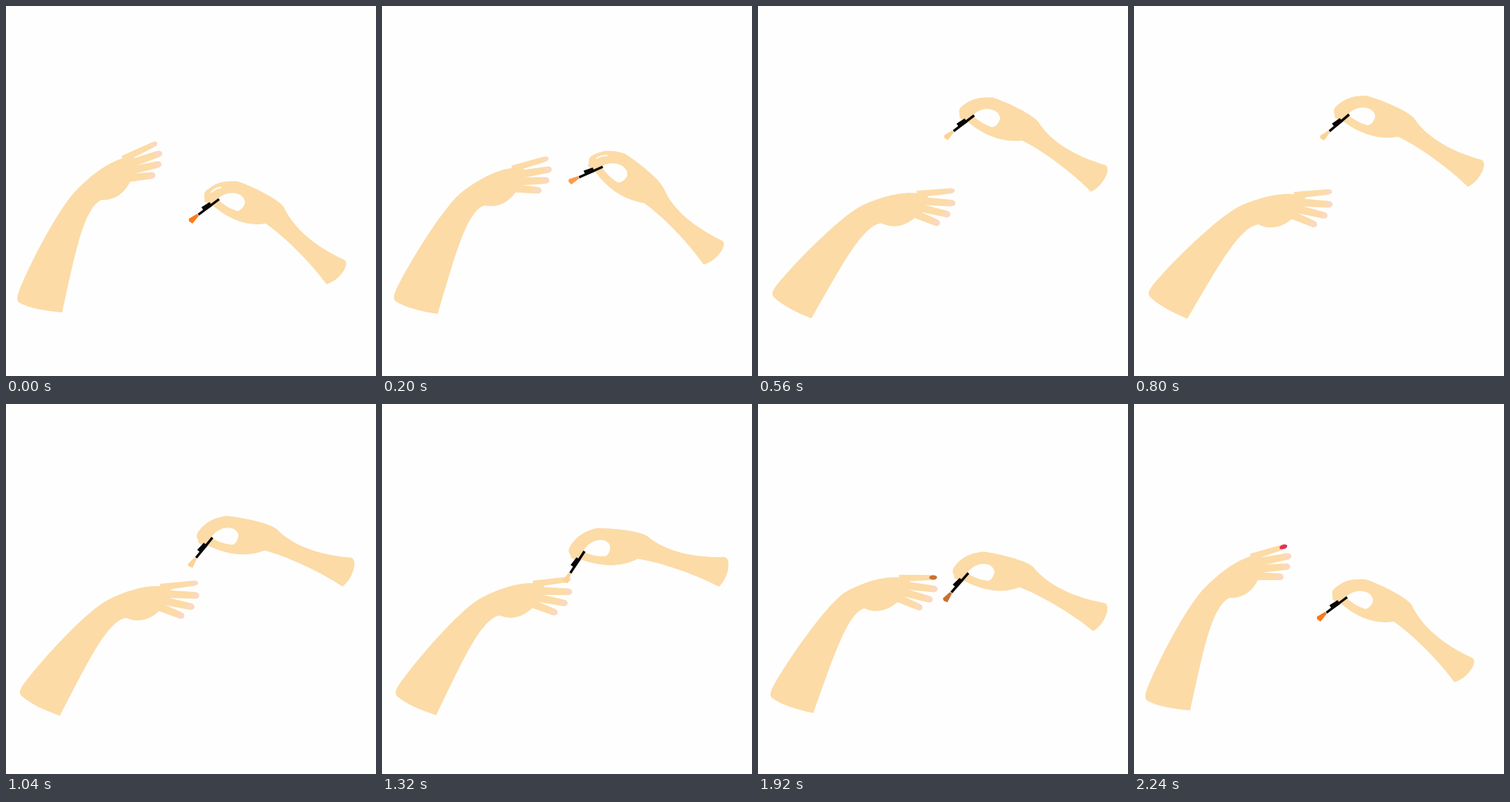
An HTML page that plays this animation: 500x500 px, repeating every 2520 ms.

```html
<!DOCTYPE html>
<html>
<head>
<meta charset="utf-8">
<style>
html, body { margin: 0; width: 100%; height: 100%; overflow: hidden; background: #fefefe; }
svg { display: block; width: 100vw; height: 100vh; }
</style>
</head>
<body>
<svg id="stage" viewBox="0 0 500 500"></svg>
<script>
const LOOP = 2520, STEP = 40, LAST = 2240;
const SKIN = '#fcdba7', NAIL = '#fbd8c1', PAPER = '#fefefe';
const ELBOW = [47, 406], LEFT_WRIST = [116, 252], RIGHT_WRIST = [363, 284];
const stage = document.getElementById('stage');

function add(tag, attrs, parent = stage) {
  const node = document.createElementNS('http://www.w3.org/2000/svg', tag);
  for (const key in attrs) node.setAttribute(key, attrs[key]);
  return parent.appendChild(node);
}

function ease(t, from, to) {
  const u = Math.min(1, Math.max(0, (t - from) / (to - from)));
  return u * u * (3 - 2 * u);
}

function mix(from, to, u) {
  return from.map((v, i) => v + (to[i] - v) * u);
}
const rgb = color => `rgb(${color.map(Math.round)})`;
const hex = code => [1, 3, 5].map(i => parseInt(code.slice(i, i + 2), 16));

// Turns points about a pivot and carries the pivot to a target.
function rotator(pivot, degrees, target = pivot) {
  const a = degrees * Math.PI / 180, c = Math.cos(a), s = Math.sin(a);
  return ([x, y]) => {
    const dx = x - pivot[0], dy = y - pivot[1];
    return [target[0] + dx * c - dy * s, target[1] + dx * s + dy * c];
  };
}

// Moves every "x y" pair of a piece of path data.
function moved(path, move) {
  return path.replace(/([\d.]+) ([\d.]+)/g, (_, x, y) => move([+x, +y]).map(v => v.toFixed(2)).join(' '));
}

function held(pivot, degrees, target) {
  return `translate(${target}) rotate(${degrees}) translate(${-pivot[0]} ${-pivot[1]})`;
}

const left = {
  outer: 'M76 414C53 412 33 409 18 401C14 398 15 393 17 387C32 348 74 268 97 247',
  palm: 'C112 232 143 204 173 203L174 229L167 239C159 254 146 263 129 262',
  inner: 'C104 274 93 338 76 414Z'
};
const right = {
  inner: 'M433 376C412 347 376 311 351 294',
  palm: 'C328 298 304 290 281 271C274 267 269 266 268 263C270 259 265 256 270 250C284 237 298 236 313 237C326 241 366 259 375 271',
  outer: 'C392 308 431 331 457 343C466 348 451 371 433 376Z',
  hole: 'M286 261C300 247 323 252 323 266C321 272 317 277 312 277C304 274 297 271 286 261Z'
};

const leftShape = add('path', { fill: SKIN });
const leftFingers = add('g', {});
const fingers = [0, 1, 2, 3].map(i => {
  const group = add('g', {}, leftFingers);
  const length = 51 - 1.5 * i * i, half = i ? 4.5 : 3.6;
  add('path', {
    d: `M0 ${-half - 1}L${length - 6} ${-half}Q${length} ${-half} ${length} 0Q${length} ${half} ${length - 6} ${half}L0 ${half + 1}Z`,
    fill: SKIN
  }, group);
  const nail = add('ellipse', { cx: length - 5, rx: 5.4, ry: half - 0.7, fill: NAIL }, group);
  return { group, nail, x: 158 + 7.5 * i - 1.8 * i * i, y: 207 + 7 * i + 0.5 * i * i, angle: 6.5 * i - 25.6 };
});

const rightShape = add('path', { fill: SKIN, 'fill-rule': 'evenodd' });
const tool = add('g', {});
const slit = add('path', { d: 'M277 252Q283 246 291 245', fill: 'none', stroke: PAPER, 'stroke-width': 1.8 }, tool);
const bristles = add('path', { d: 'M247 287.5L247.5 291L252 294L260.5 283.5L258 281Z' }, tool);
add('path', { d: 'M260 282L288 261', stroke: '#0a0606', 'stroke-width': 3.4 }, tool);
add('path', { d: 'M264 272L275 265L279 270L268 277.5Z', fill: '#0a0606' }, tool);

function draw(t) {
  const lift = ease(t, 0, 640), lower = ease(t, 800, 1200);
  const stroke = ease(t, 1320, 1640), leave = ease(t, 1640, LAST);
  const flick = Math.sin(Math.PI * lift), trail = Math.sin(Math.PI * leave);

  const armAngle = 18 * lift - 4.6 * lower - 13.4 * leave;
  const handAngle = 23 * lift - 4 * lower - 19 * leave + 6.5 * flick + 11 * trail;
  const arm = rotator(ELBOW, armAngle);
  const hand = rotator(LEFT_WRIST, handAngle, arm(LEFT_WRIST));
  leftShape.setAttribute('d', moved(left.outer, arm) + moved(left.palm, hand) + moved(left.inner, arm));
  leftFingers.setAttribute('transform', held(LEFT_WRIST, handAngle, arm(LEFT_WRIST)));
  const curl = 2 * lower + 6 * leave, spread = 3 * (lift - leave);
  fingers.forEach((f, i) => {
    const angle = f.angle + curl + spread * (i - 1);
    f.group.setAttribute('transform', `translate(${f.x} ${f.y}) rotate(${angle})`);
  });

  const wrist = [
    363 + 4 * lift + 3.5 * flick - 15 * lower + 10 * stroke + leave,
    284 - 119 * lift + 30 * lower + 89 * leave
  ];
  const forearmAngle = -9.4 * lift + 4.6 * flick - 16.6 * lower + 26 * leave;
  const gripAngle = -3.5 * lift + 20.6 * flick - 16.5 * lower - 2 * stroke + 22 * leave;
  const forearm = rotator(RIGHT_WRIST, forearmAngle, wrist);
  const grip = rotator(RIGHT_WRIST, gripAngle, wrist);
  rightShape.setAttribute('d', moved(right.inner, forearm) + moved(right.palm, grip)
    + moved(right.outer, forearm) + moved(right.hole, grip));
  tool.setAttribute('transform', held(RIGHT_WRIST, gripAngle, wrist));
  slit.setAttribute('opacity', 1 - ease(t, 360, 600));

  // Polish: fades to pale, then takes colour again during the stroke.
  const browning = ease(t, 1640, 1920), brightening = ease(t, 1920, LAST);
  const orange = hex('#fb9f4a'), brown = hex('#c97030');
  const finish = (color, last) =>
    rgb(mix(mix(mix(color, orange, stroke), brown, browning), hex(last), brightening));
  bristles.setAttribute('fill', finish(mix(hex('#ff7a1a'), hex('#fcd296'), ease(t, 0, 480)), '#ff761a'));
  fingers[0].nail.setAttribute('fill', finish(hex(NAIL), '#e0335a'));
}

const start = performance.now();
function tick() {
  const t = (performance.now() - start) % LOOP;
  draw(Math.min(Math.floor(t / STEP) * STEP, LAST));
  requestAnimationFrame(tick);
}
tick();
</script>
</body>
</html>
```
